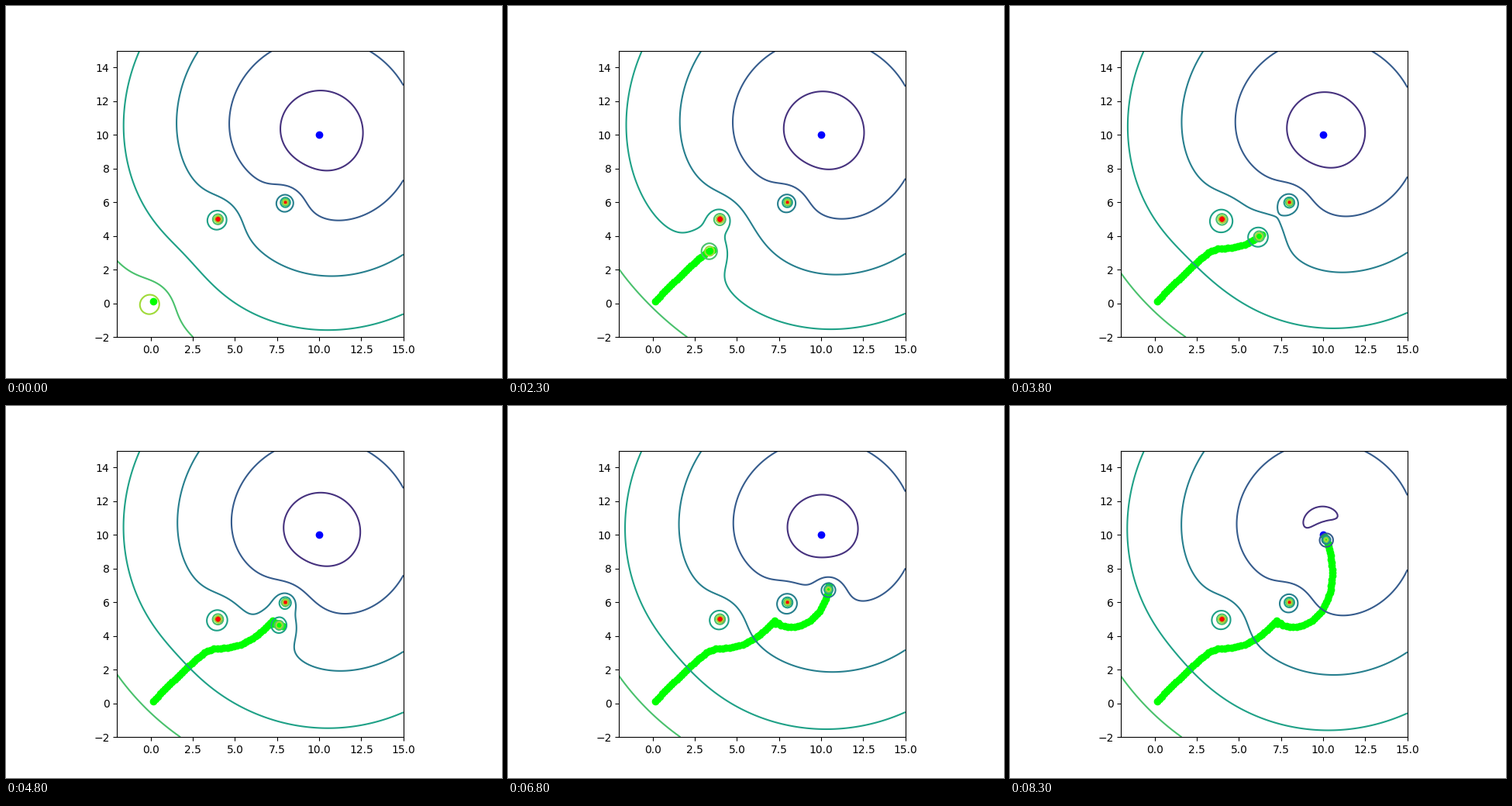
Write a matplotlib script that moves like this. It is 640 px wide and 480 px high and loops after 8.4 s.

```python
import numpy as np
import matplotlib.pyplot as plt
from matplotlib.animation import FuncAnimation

FRAMES = 84
INTERVAL = 100
GOAL = np.array([10, 10])
OBSTACLES = np.array([(4, 5), (8, 6)])
GAIN = 2.0
STEP = 0.2
OFFSET = 0.25
CEILING = 20
LEVELS = 3 * np.arange(8)

axis = np.linspace(-2, 15, 171)
X, Y = np.meshgrid(axis, axis)


def distance(point):
    return np.hypot(X - point[0], Y - point[1])


def repulsion(point):
    return GAIN / np.maximum(distance(point), 1e-6)


def force(pos):
    """Downhill direction of the goal's cone and the obstacles' 1/r peaks."""
    pull = (GOAL - pos) / np.linalg.norm(GOAL - pos)
    away = pos - OBSTACLES
    r = np.linalg.norm(away, axis=1, keepdims=True)
    return pull + (GAIN * away / r**3).sum(axis=0)


def descend(count):
    path = [np.zeros(2)]
    for _ in range(count):
        f = force(path[-1])
        path.append(path[-1] + STEP * f / np.linalg.norm(f))
    return np.array(path)


path = descend(FRAMES)
static_field = distance(GOAL) - OFFSET + sum(repulsion(o) for o in OBSTACLES)

fig, ax = plt.subplots(figsize=(6.4, 4.8), dpi=100)
ax.set_aspect("equal")
ax.set_xlim(-2, 15)
ax.set_ylim(-2, 15)
ax.plot(*OBSTACLES.T, "o", color="red")
ax.plot(*GOAL, "o", color="blue")
trail, = ax.plot([], [], "o", color="lime")
contours = None


def clear():
    global contours
    if contours is not None:
        contours.remove()
        contours = None
    trail.set_data([], [])
    return []


def update(i):
    global contours
    clear()
    # the robot raises the field where it stands; its next dot is one step on
    field = np.minimum(static_field + repulsion(path[i]), CEILING)
    contours = ax.contour(X, Y, field, levels=LEVELS, cmap="viridis")
    trail.set_data(*path[1:i + 2].T)
    return []


anim = FuncAnimation(fig, update, frames=FRAMES, init_func=clear,
                     interval=INTERVAL, repeat=True, repeat_delay=0)
plt.show()
```
